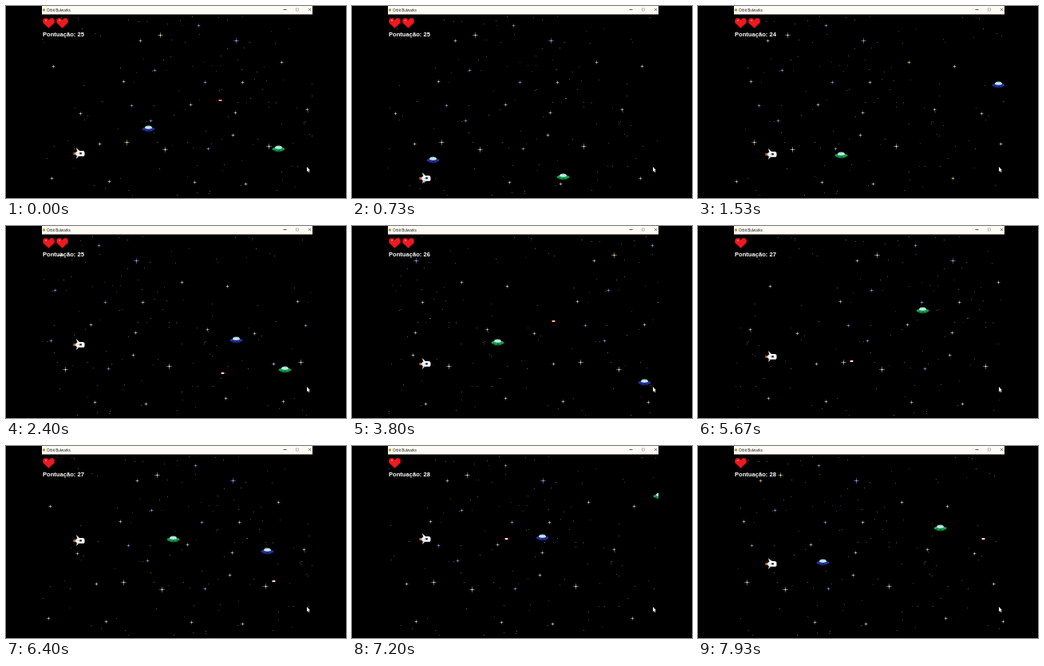
Write an HTML page with a canvas that moves like this. It is 426x240 px and loops after 8000 ms.

```html
<!DOCTYPE html>
<html lang="pt">
<head>
<meta charset="utf-8">
<title>Orbit Bulwarks</title>
<style>
  html, body { margin: 0; width: 100%; height: 100%; overflow: hidden; background: #000; }
  canvas { display: block; width: 426px; height: 240px; }
</style>
</head>
<body>
<canvas id="stage" width="426" height="240"></canvas>
<script>
const ctx = document.getElementById('stage').getContext('2d');
const LOOP = 8000, STEPS_PER_SECOND = 15;
const LEFT = 45, TOP = 10.5, RIGHT = 384, SKY_WIDTH = 343;
const SPAWN_X = 413;

// [step, distance scrolled]; everything in the game is paced by this distance
const SCROLL = [[0, 0], [23, 81], [36, 125], [57, 208.5], [74, 276], [96, 347.5], [119, 433], [120, 436.7]];

// [distance, height of the ship]
const SHIP = [[0, 184], [16, 215], [53, 215], [68, 186], [82, 185], [107, 184], [125, 148],
  [140, 119], [182, 119], [208.5, 172], [215, 160], [255, 160], [268, 185], [276, 185],
  [284, 169], [308, 169], [334, 127], [339, 117], [347.5, 118], [368, 116], [402, 116],
  [418, 147], [440, 147]];

const BLUE = ['#26309c', '#141a5c'], GREEN = ['#12a04c', '#075c2c'];
const ALIENS = [
  { hue: BLUE, from: 0, to: 62.5, x: 178, y: 153 },
  { hue: GREEN, from: 0, to: 93, x: 341, y: 178 },
  { hue: BLUE, from: 62.5, to: 185, y: 79.5 },
  { hue: GREEN, from: 93, to: 245.5, y: 211 },
  { hue: BLUE, from: 185, to: 304.5, y: 218.5 },
  { hue: GREEN, from: 245.5, to: 378, y: 38.5 },
  { hue: BLUE, from: 304.5, to: 500, y: 174 },
  { hue: GREEN, from: 378, to: 500, y: 47 }
];

// [distance when fired, height, core colour]
const SHOTS = [[-42, 118, '#f99'], [82.25, 184, '#fdc'], [170.5, 119, '#fba'],
  [288.75, 169, '#fff'], [368.75, 116, '#ffd']];
const SCORES = [[0, 25], [62.5, 24], [93, 25], [185, 26], [304.5, 27], [378, 28]];
const LIFE_LOST = 245.5;

// x, y, tint; capitals are the larger stars
const TINTS = { w: '#c9c9c4', y: '#d2c795', b: '#8c98dc', o: '#c98d62' };
const STARS = `193 36 Y,241 24 b,288 43 B,168 43 y,59 75 w,186 80 b,147 94 w,249 95 b,345 70 y,
  296 95 w,231 123 y,287 133 w,377 129 y,93 134 w,181 143 b,284 161 w,117 172 w,151 170 Y,
  199 179 W,329 175 W,253 178 b,57 215 y,129 219 w,236 220 y,300 222 w,157 124 b`
  .split(',').map(entry => {
    const [x, y, tint] = entry.trim().split(' ');
    return { x: +x, y: +y, big: tint < 'a', color: TINTS[tint.toLowerCase()] };
  });

let seed = 77;
const random = () => (seed = seed * 16807 % 2147483647) / 2147483647;
const DUST = Array.from({ length: 125 }, () => ({
  x: LEFT + random() * SKY_WIDTH,
  y: 12 + random() * 227,
  color: ['#4b4a42', '#36364c', '#57523a', '#343434', '#5e5e5a'][Math.floor(random() * 5)]
}));

function along(points, at) {
  let i = 1;
  while (i < points.length - 1 && points[i][0] < at) i++;
  const [a, from] = points[i - 1], [b, to] = points[i];
  return from + (to - from) * (at - a) / (b - a);
}

function rect(color, x, y, w, h) {
  ctx.fillStyle = color;
  ctx.fillRect(x, y, w, h);
}

function oval(color, x, y, rx, ry, from = 0, to = Math.PI * 2) {
  ctx.fillStyle = color;
  ctx.beginPath();
  ctx.ellipse(x, y, rx, ry, 0, from, to);
  ctx.fill();
}

function shape(color, points) {
  ctx.fillStyle = color;
  ctx.beginPath();
  points.forEach(([x, y]) => ctx.lineTo(x, y));
  ctx.fill();
}

function label(text, x, y, font, color) {
  ctx.font = font;
  ctx.fillStyle = color;
  ctx.fillText(text, x, y);
}

function drawSky(scroll) {
  const wrap = x => LEFT + Math.round((((x - LEFT - scroll) % SKY_WIDTH) + SKY_WIDTH) % SKY_WIDTH);
  for (const dot of DUST) rect(dot.color, wrap(dot.x), Math.round(dot.y), 1, 1);
  for (const { x, y, big, color } of STARS) {
    const left = wrap(x), arm = big ? 3 : 2;
    ctx.globalAlpha = big ? 0.45 : 0.3;
    rect(color, left - arm, y, arm * 2 + 1, 1);
    rect(color, left, y - arm, 1, arm * 2 + 1);
    ctx.globalAlpha = big ? 0.75 : 0.5;
    rect(color, left - 1, y, 3, 1);
    rect(color, left, y - 1, 1, 3);
    ctx.globalAlpha = 1;
    rect(color, left, y, 1, 1);
  }
}

// Aliens drift towards the height of the ship
function alienHeight({ from, y }, scroll) {
  const pace = 0.5;
  for (let s = from; s < scroll; s += pace) {
    const gap = along(SHIP, s) - 2 - y;
    y += Math.max(-pace, Math.min(pace, gap));
  }
  return y;
}

function drawAlien(alien, scroll) {
  const x = Math.round((alien.x ?? SPAWN_X) - 2 * (scroll - alien.from));
  const y = Math.round(alienHeight(alien, scroll));
  const [body, shade] = alien.hue;
  oval(shade, x + 0.5, y + 1.8, 6.5, 2.7);
  oval(body, x + 0.5, y + 0.8, 8, 2.5);
  oval('#a9dcdc', x + 0.5, y - 0.2, 4.6, 3.4, Math.PI, 0);
  oval('#cdeeea', x + 0.5, y - 0.4, 4.2, 1.1);
  rect(shade, x - 5, y + 2, 2, 1);
  rect(shade, x, y + 2, 2, 1);
  rect(shade, x + 5, y + 2, 2, 1);
}

function drawShip(y) {
  const x = 93;
  rect('#a63a1c', x - 9, y - 1, 3, 3);
  rect('#f0a050', x - 7, y - 1, 2, 3);
  for (const side of [-1, 1]) {
    shape('#e6e6e6', [[x - 5, y + side * 7], [x - 2, y + side * 4], [x - 1, y + side * 3], [x - 4, y + side * 3]]);
  }
  ctx.fillStyle = '#fff';
  ctx.beginPath();
  ctx.roundRect(x - 5, y - 3, 10.5, 7, 2.5);
  ctx.fill();
  rect('#b9bfd0', x - 4, y + 3, 8, 1);
  rect('#34466e', x - 1, y - 1, 3, 2.5);
  rect('#8d95a8', x - 3, y, 1, 1);
}

function drawShot([fired, y, core], scroll) {
  const x = Math.round(100 + 4 * (scroll - fired));
  if (x < 100 || x > RIGHT + 3) return;
  rect('#c22', x - 2, y - 1, 5, 2);
  rect(core, x - 1, y - 1, 3, 2);
}

function drawHeart(x) {
  const y = 15;
  const outline = [[2, 0], [5, 0], [7.5, 2.5], [10, 0], [13, 0], [15, 2], [15, 6], [7.5, 13], [0, 6], [0, 2]];
  shape('#a80d12', outline.map(([px, py]) => [x + px, y + py]));
  shape('#f0191f', outline.map(([px, py]) => [x + 7.5 + (px - 7.5) * 0.87, y + 6 + (py - 6) * 0.87]));
  rect('#ff6a64', x + 3, y + 2, 2, 2);
}

function drawTitleBar() {
  rect('#fbfaf4', LEFT, 0, RIGHT - LEFT, TOP);
  oval('#b39a3c', 47.5, 5, 1.8, 1.8);
  label('Orbit Bulwarks', 51, 6.8, '4.6px "Liberation Sans", Arial, sans-serif', '#222');
  rect('#555', 347.5, 4, 4, 1);
  ctx.lineWidth = 0.6;
  ctx.strokeStyle = '#999';
  ctx.strokeRect(363.5, 3, 3, 3);
  ctx.strokeStyle = '#333';
  ctx.beginPath();
  ctx.moveTo(379, 3); ctx.lineTo(382, 6);
  ctx.moveTo(382, 3); ctx.lineTo(379, 6);
  ctx.stroke();
}

function drawPointer() {
  shape('#f2f2e4', [[377, 201], [377, 207], [378.4, 206], [379.4, 208], [380.4, 207.5], [379.5, 205.5], [381, 205.3]]);
}

function render(time) {
  const step = Math.floor((time % LOOP + 4) * STEPS_PER_SECOND / 1000);
  const scroll = along(SCROLL, step);
  rect('#000', 0, 0, 426, 240);

  ctx.save();
  ctx.beginPath();
  ctx.rect(LEFT, TOP, RIGHT - LEFT, 240 - TOP);
  ctx.clip();
  drawSky(scroll);
  SHOTS.forEach(shot => drawShot(shot, scroll));
  drawShip(Math.round(along(SHIP, scroll)));
  ALIENS.filter(a => scroll >= a.from && scroll < a.to).forEach(a => drawAlien(a, scroll));
  ctx.restore();

  drawHeart(46);
  if (scroll < LIFE_LOST) drawHeart(63);
  const score = SCORES.filter(([since]) => since <= scroll).pop()[1];
  label(`Pontuação: ${score}`, 46, 37.5, 'bold 7.6px "Liberation Sans", Arial, sans-serif', '#fff');
  drawTitleBar();
  drawPointer();
}

const start = performance.now();
function tick() {
  render(performance.now() - start);
  requestAnimationFrame(tick);
}
tick();
</script>
</body>
</html>
```
